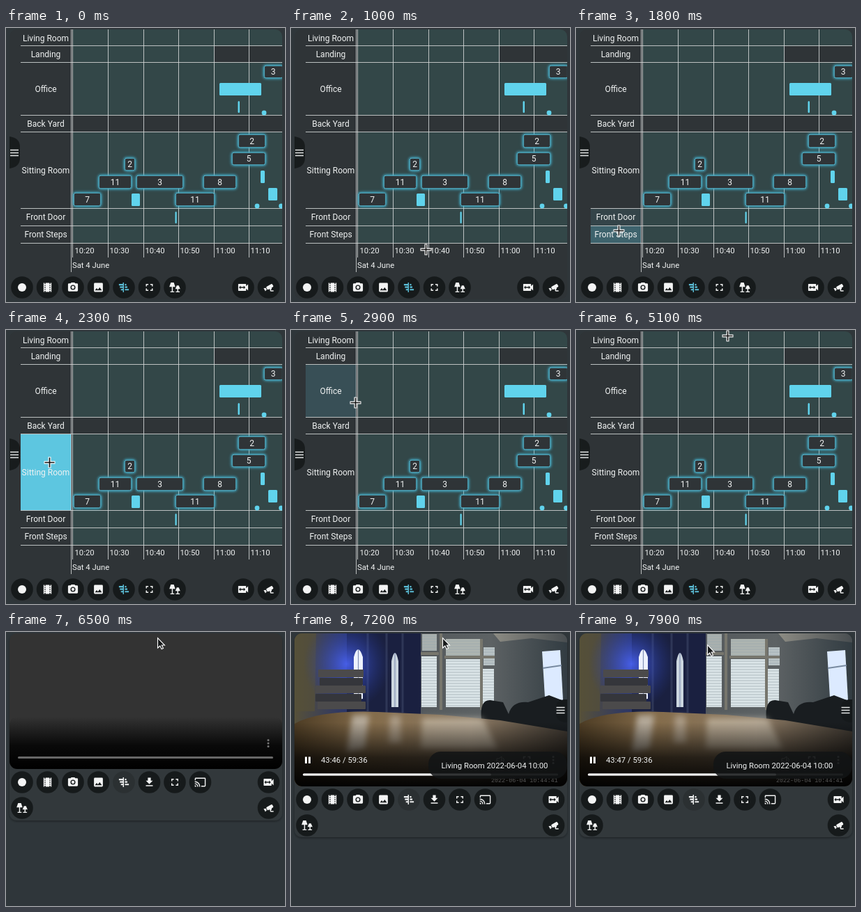
An HTML page for the animation above (8 s loop, 400 px wide and 394 px high).

```html
<!DOCTYPE html>
<html lang="en">
<head>
<meta charset="utf-8">
<title>Camera timeline</title>
<style>
html, body { margin: 0; width: 100%; height: 100%; overflow: hidden; background: #2f363a; }
svg { display: block; width: 100vw; height: 100vh; }
text { font: 11.3px Roboto, "Liberation Sans", sans-serif; fill: #f0f2f2; }
.mid { font-size: 12px; text-anchor: middle; }
.stamp { font: 8.4px "Liberation Mono", monospace; fill: #555; }
.event { fill: #2f3437; stroke: #62c6de; stroke-width: 1.2; stroke-dasharray: 1 1; filter: drop-shadow(0 0 2px #4cc4e4) drop-shadow(0 0 1.5px #3f9fb8); }
</style>
</head>
<body>
<svg id="stage" viewBox="0 0 400 394">
  <defs>
    <linearGradient id="shade" x1="0" y1="0" x2="0" y2="1">
      <stop offset="0" stop-color="#000" stop-opacity="0"/>
      <stop offset=".55" stop-color="#000" stop-opacity=".82"/>
      <stop offset="1" stop-color="#000"/>
    </linearGradient>
    <linearGradient id="scrim" x1="0" y1="0" x2="0" y2="1">
      <stop offset="0" stop-color="#000" stop-opacity="0"/>
      <stop offset=".55" stop-color="#000" stop-opacity=".72"/>
      <stop offset="1" stop-color="#000" stop-opacity=".97"/>
    </linearGradient>
    <linearGradient id="table" x1="0" y1="0" x2="1" y2="0">
      <stop offset="0" stop-color="#4d3c24"/><stop offset=".28" stop-color="#846c4b"/>
      <stop offset=".65" stop-color="#8a7862"/><stop offset="1" stop-color="#3d3730"/>
    </linearGradient>
    <linearGradient id="wall" x1="0" y1="0" x2="1" y2="0">
      <stop offset="0" stop-color="#565039"/><stop offset=".2" stop-color="#29346a"/>
      <stop offset=".48" stop-color="#555a5d"/><stop offset=".72" stop-color="#5d6264"/>
      <stop offset="1" stop-color="#323c42"/>
    </linearGradient>
    <linearGradient id="ceiling" x1="0" y1="0" x2="1" y2="0">
      <stop offset="0" stop-color="#8d8c84"/><stop offset="1" stop-color="#484d50"/>
    </linearGradient>
    <radialGradient id="halo">
      <stop offset="0" stop-color="#4c66ff" stop-opacity=".85"/>
      <stop offset="1" stop-color="#263ca0" stop-opacity="0"/>
    </radialGradient>
    <clipPath id="card"><rect x="5" y="2" width="391" height="388" rx="10"/></clipPath>
    <clipPath id="screen"><rect x="5" y="2" width="391" height="220" rx="11"/></clipPath>
    <filter id="soft"><feGaussianBlur stdDeviation=".7"/></filter>
    <filter id="blur"><feGaussianBlur stdDeviation="4"/></filter>
    <filter id="shadow" x="-5%" y="-5%" width="110%" height="112%">
      <feDropShadow dx="0" dy="1.5" stdDeviation="1.5" flood-opacity=".35"/>
    </filter>
  </defs>
  <g id="timeline"></g>
  <g id="player"></g>
  <g id="cross" fill="none">
    <path d="M0-8V8M-8 0H8" stroke="#fff" stroke-width="4"/>
    <path d="M0-7V7M-7 0H7" stroke="#111" stroke-width="1.6"/>
  </g>
  <path id="arrow" d="M0 0V14.5L3.3 11.5L5.6 16L8 14.9L5.8 10.5H10Z" fill="#17191a" stroke="#fff" stroke-width="1.1"/>
</svg>
<script>
const LOOP = 8000, STEP = 100;
const $ = id => document.getElementById(id);
const rect = (x, y, x2, y2, attrs = '') =>
  `<rect x="${x}" y="${y}" width="${x2 - x}" height="${y2 - y}" ${attrs}/>`;
const dot = (x, y, r, fill) => `<circle cx="${x}" cy="${y}" r="${r}" fill="${fill}"/>`;
const label = (x, y, str, cls = '') => `<text x="${x}" y="${y}" class="${cls}">${str}</text>`;
const path = (d, attrs) => `<path d="${d}" ${attrs}/>`;

const ICONS = {
  film: 'M18 9H16V7H18M18 13H16V11H18M18 17H16V15H18M8 9H6V7H8M8 13H6V11H8M8 17H6V15H8M18 3V5H16V3H8V5H6V3H4V21H6V19H8V21H16V19H18V21H20V3Z',
  camera: 'M4 4H7L9 2H15L17 4H20A2 2 0 0 1 22 6V18A2 2 0 0 1 20 20H4A2 2 0 0 1 2 18V6A2 2 0 0 1 4 4M12 7A5 5 0 0 0 12 17A5 5 0 0 0 12 7M12 9A3 3 0 0 1 12 15A3 3 0 0 1 12 9Z',
  image: 'M8.5 13.5L11 16.5L14.5 12L19 18H5M21 19V5A2 2 0 0 0 19 3H5A2 2 0 0 0 3 5V19A2 2 0 0 0 5 21H19A2 2 0 0 0 21 19Z',
  gantt: 'M2 5H10V2H12V22H10V18H6V15H10V13H4V10H10V8H2ZM14 5H17V8H14ZM14 10H19V13H14ZM14 15H22V18H14Z',
  full: 'M5 5H10V7H7V10H5ZM14 5H19V10H17V7H14ZM17 14H19V19H14V17H17ZM10 17V19H5V14H7V17Z',
  download: 'M5 20H19V18H5M19 9H15V3H9V9H5L12 16Z',
  cast: 'M1 10V12A9 9 0 0 1 10 21H12A11 11 0 0 0 1 10M1 14V16A5 5 0 0 1 6 21H8A7 7 0 0 0 1 14M1 18V21H4A3 3 0 0 0 1 18M21 3H3A2 2 0 0 0 1 5V8H3V5H21V19H14V21H21A2 2 0 0 0 23 19V5A2 2 0 0 0 21 3Z',
  lamps: 'M4 2H10L13 11H8V20H11V22H3V20H6V11H1ZM16 8H20L23 15H19V20H22V22H14V20H17V15H13Z',
  swap: 'M13 15.5V13H7V15.5L3.5 12L7 8.5V11H13V8.5L16.5 12M18 9.5V6A1 1 0 0 0 17 5H3A1 1 0 0 0 2 6V18A1 1 0 0 0 3 19H17A1 1 0 0 0 18 18V14.5L22 18.5V5.5Z',
  cctv: 'M18.2 4.9Q17.6 4.9 17 5.2L8.4 10.2A2 2 0 0 0 7.6 12.9L9.1 15.5A2 2 0 0 0 11.9 16.3L13.7 15.2Q14.1 16 14.8 16.3V18A2 2 0 0 0 16.8 20H22V18H16.8V16.3A2.5 2.5 0 0 0 18 12.7L20.5 11.3A2 2 0 0 0 21.2 8.5L19.7 5.9A2 2 0 0 0 18.2 4.9M6.2 13.2L2 13.9L5.5 19.9L8.2 16.6Z'
};

function button(name, x, y, id = '') {
  const icon = ICONS[name]
    ? path(ICONS[name], 'fill-rule="evenodd" transform="scale(.71) translate(-12 -12)"')
    : dot(0, 0, 6, '#f3f4f4');
  return `<g transform="translate(${x} ${y})" fill="#f3f4f4" ${id && `id="${id}"`}>${dot(0, 0, 15.8, '#161a1b')}${icon}</g>`;
}
const buttonRow = (names, y) => names.map((n, i) => button(n, 23 + i * 36.5, y, n === 'gantt' && y > 300 ? 'toggle' : '')).join('');
const menuLines = (x, y) => path([-4, 0, 4].map(d => `M${x} ${y + d}h12`).join(''), 'stroke="#e4e6e6" stroke-width="1.5"');
const dots = y => [-4.5, 0, 4.5].map(d => dot(376, y + d, 1.5, '#777')).join('');

// name, top, bottom, end of recorded stretch
const ROWS = [
  ['Living Room', 2, 25, 396], ['Landing', 26, 49, 298], ['Office', 50, 125, 396],
  ['Back Yard', 126, 149, 96], ['Sitting Room', 150, 259, 396],
  ['Front Door', 260, 284, 396], ['Front Steps', 285, 309, 396]
];
const GROUPS = [
  [97, 237, 136, 256, 7], [133, 212, 180, 231, 11], [170, 187, 185, 205, 2],
  [187, 212, 254, 231, 3], [243, 237, 299, 256, 11], [283, 212, 330, 231, 8],
  [333, 153, 372, 172, 2], [324, 179, 372, 197, 5], [370, 54, 397, 72, 3]
];
const BARS = [
  [306, 79, 366, 97], [332.5, 105, 335, 122], [365, 205, 371, 223],
  [376, 230, 389, 248], [180, 238, 192, 256], [242.5, 264, 244.7, 281]
];
const CYAN = '#60d3ec';

function drawTimeline() {
  const ticks = ['10:20', '10:30', '10:40', '10:50', '11:00', '11:10'];
  const tickX = i => Math.floor(96 + i * 50.5) + .5;
  const names = ROWS.map(([name, top, bottom]) => label(57, (top + bottom) / 2 + (top < 10 ? 5 : 4.4), name, 'mid')).join('');
  const lines = ROWS.map(r => `M21 ${r[2] + .5}H396`).join('') + ticks.map((_, i) => `M${tickX(i) - (i ? 0 : 1)} 2V330`).join('') + 'M93.5 2V351';
  $('timeline').innerHTML = `<g clip-path="url(#card)">` +
    rect(5, 2, 396, 390, 'fill="#2f3437"') +
    ROWS.map(([, top, bottom, end], i) =>
      rect(96, top, end, bottom, 'fill="#334748"') +
      rect(21, top, 93, bottom, `id="row${i}" fill="#5dc6e0" opacity="0"`)).join('') +
    path(lines, 'stroke="#d5d9d9" fill="none" opacity=".85"') + names +
    ticks.map((t, i) => label(tickX(i) + 2, 324, t)).join('') + label(95, 345, 'Sat 4 June') +
    GROUPS.map(([x, y, x2, y2, n]) => rect(x + .5, y + .5, x2 - .5, y2 - .5, 'class="event" rx="2"') +
      label(n === 3 && y < 100 ? 383 : (x + x2) / 2, (y + y2) / 2 + 4.2, n, 'mid')).join('') +
    BARS.map(b => rect(...b, `rx="1.5" fill="${CYAN}"`)).join('') +
    [[370, 122], [360, 256], [394.5, 256]].map(([x, y]) => dot(x, y, 3.4, CYAN)).join('') +
    path('M5 156Q20 158 20 171V187Q20 200 5 202Z', 'fill="#181c1d"') + menuLines(6, 179.5) +
    buttonRow(['mark', 'film', 'camera', 'image', 'gantt', 'full', 'lamps'], 373) +
    button('swap', 340, 373) + button('cctv', 376.5, 373) + '</g>';
}

function drawScene() {
  const blinds = (x, y, x2, y2, fill = '#dbe5e8') => rect(x, y, x2, y2, `fill="${fill}"`) +
    path(Array.from({ length: Math.floor((y2 - y) / 4) }, (_, i) => `M${x} ${y + 3 + i * 4}H${x2}`).join(''), 'stroke="#98a6ad" stroke-width=".7"');
  const books = [[39, 54, 104], [41, 66, 103], [35, 77, 107], [35, 89, 101], [38, 100, 107]];
  return rect(5, 2, 396, 222, 'fill="url(#wall)"') + `<g filter="url(#soft)">` +
    path('M5 2H36L34 114H5Z', 'fill="#565038" opacity=".7"') +
    path('M80 2H186V118H80Z', 'fill="#1a2040"') +
    path('M110 2V114M137 2V116M160 2V116', 'stroke="#2e3656" stroke-width="3"') +
    path('M290 2H396V15L345 9L300 14Z', 'fill="url(#ceiling)"') +
    '<ellipse cx="80" cy="46" rx="62" ry="66" fill="url(#halo)"/>' +
    path('M90 98V36Q96 14 103 36V96Z', 'fill="#eef2ff"') +
    path('M144 108V42Q149 18 154 42V108Z', 'fill="#cbd6df"') +
    path('M96.5 25V97M149 30V108', 'stroke="#8491b5" stroke-width="1.2"') +
    blinds(188, 3, 209, 27, '#a9b0ae') + blinds(187, 35, 209, 108) +
    blinds(222, 10, 271, 34, '#aeb5b1') + blinds(222, 39, 271, 108) +
    blinds(276, 22, 292, 48, '#b9c3c5') + blinds(275, 53, 291, 106) +
    path('M215 2V112M273 10V112M220 36H292M186 31H212', 'stroke="#77766d" stroke-width="4"') +
    path('M360 28L386 26L390 98L364 94Z', 'fill="#dceaff"') + path('M361 52L388 48', 'stroke="#788aa0" stroke-width="2"') +
    books.map(([x, y, x2], i) => rect(x, y, x2, y + 11, `rx="1" fill="${i % 2 ? '#35363b' : '#4b4a4b'}"`)).join('') +
    path('M273 126Q270 97 286 98L304 101L312 118Q317 99 340 101L370 91L396 101V150Z', 'fill="#191d20"') +
    path('M5 132Q40 112 125 115L215 119L300 127L396 143V222H5Z', 'fill="url(#table)"') + '</g>' +
    `<g filter="url(#blur)">` + path('M88 119H112L106 168L80 174Z', 'fill="#d6d2cd" opacity=".6"') +
    path('M142 120H157L158 160H140Z', 'fill="#c9c2b6" opacity=".5"') +
    path('M188 123H274L296 168H186Z', 'fill="#d9d1c2" opacity=".5"') + '</g>' +
    rect(5, 130, 396, 222, 'fill="url(#scrim)"');
}

function drawPlayer() {
  const controls = rect(20, 179.5, 23, 189, 'fill="#fff"') + rect(25, 179.5, 28, 189, 'fill="#fff"') +
    `<text id="clock" x="43" y="188"></text>` + label(287, 216, '2022-06-04 10:44:41', 'stamp') +
    rect(17, 203.5, 383, 206.5, 'rx="1.5" fill="#606060"') + rect(17, 203.5, 287, 206.5, 'rx="1.5" fill="#fff"') +
    path(ICONS.full, 'fill="#888" transform="translate(329 175) scale(.75)"') +
    path('M295 182h3l4-3v10l-4-3h-3ZM304 181q3 3 0 6', 'fill="none" stroke="#888"') + dots(184) +
    rect(197, 172, 396, 211, 'rx="18" fill="#121416" opacity=".86"') +
    label(215.5, 196, 'Living Room 2022-06-04 10:00') +
    path('M396 97H391Q380 99 380 107V118Q380 127 391 130H396Z', 'fill="#15191b"') + menuLines(380.5, 112.5);
  $('player').innerHTML =
    rect(5, 2, 396, 271, 'id="panel" rx="10" fill="#30373a" filter="url(#shadow)"') +
    `<g id="empty">${rect(5, 2, 396, 197, 'rx="11" fill="#333"')}${rect(5, 122, 396, 197, 'rx="11" fill="url(#shade)"')}` +
    rect(17, 179, 383, 182, 'rx="1.5" fill="#676767"') + dots(160) + '</g>' +
    `<g id="video" clip-path="url(#screen)">${drawScene()}${controls}</g>` +
    `<g id="dock">${buttonRow(['mark', 'film', 'camera', 'image', 'gantt', 'download', 'full', 'cast'], 216)}` +
    button('swap', 376.5, 216) + button('lamps', 23, 253) + button('cctv', 376.5, 253) + '</g>';
  $('dock').children[4].firstChild.setAttribute('fill', '#2b3032');
}

// time, x, y
const ROUTE = [
  [400, 394, 322], [900, 155, 316], [1200, 268, 323], [1300, 262, 323], [1700, 66, 308],
  [1800, 61, 291], [2100, 62, 205], [2300, 62, 190], [2500, 72, 178], [2700, 125, 145],
  [3000, 76, 84], [3200, 77, 55], [3400, 78, 33], [4200, 78, 33], [4700, 156, 24],
  [4800, 156, 24], [5100, 217, 8], [7200, 217, 8], [7900, 188, 18]
];
// row, hover start, hover end
const HOVERS = [[6, 1710, 1880], [5, 1770, 2000], [4, 1970, 2550], [2, 2850, 3130], [1, 3130, 4280]];
const FADE = 280;
const clamp = v => Math.max(0, Math.min(1, v));
const mix = (a, b, k) => a + (b - a) * k;
const blend = (a, b, k) => `rgb(${a.map((v, i) => Math.round(mix(v, b[i], k)))})`;

function cursorAt(t) {
  const next = ROUTE.findIndex(p => p[0] > t);
  if (next < 0) return ROUTE[ROUTE.length - 1].slice(1);
  const b = ROUTE[next], a = ROUTE[Math.max(0, next - 1)];
  const k = b[0] > a[0] ? (t - a[0]) / (b[0] - a[0]) : 0;
  return [mix(a[1], b[1], k), mix(a[2], b[2], k)];
}
const show = (id, on) => $(id).setAttribute('display', on ? 'inline' : 'none');

function render(now) {
  const t = Math.floor(now % LOOP / STEP) * STEP;
  const playing = t >= 6500, loaded = t >= 7000;
  show('timeline', !playing);
  show('player', playing);
  show('empty', !loaded);
  show('video', loaded);
  show('cross', t >= 400 && t < 6100);
  show('arrow', t >= 6100);

  const place = `translate(${cursorAt(t).map(v => Math.round(v) + .5)})`;
  $('cross').setAttribute('transform', place);
  $('arrow').setAttribute('transform', place);

  for (const [row, start, end] of HOVERS) {
    const level = Math.min(clamp((t - start) / FADE), clamp((end - start) / FADE) - clamp((t - end) / FADE));
    $('row' + row).setAttribute('opacity', clamp(level));
  }
  const off = clamp((t - 6000) / 300), toggle = $('toggle');
  toggle.firstChild.setAttribute('fill', blend([22, 26, 27], [43, 48, 50], off));
  toggle.setAttribute('fill', blend([91, 190, 215], [243, 244, 244], off));

  $('panel').setAttribute('height', loaded ? 293 : 269);
  $('dock').setAttribute('transform', `translate(0 ${loaded ? 25 : 0})`);
  $('clock').textContent = `43:${t < 7400 ? 46 : 47} / 59:36`;
}

drawTimeline();
drawPlayer();
const began = performance.now();
function tick() {
  render(performance.now() - began);
  requestAnimationFrame(tick);
}
tick();
</script>
</body>
</html>
```
